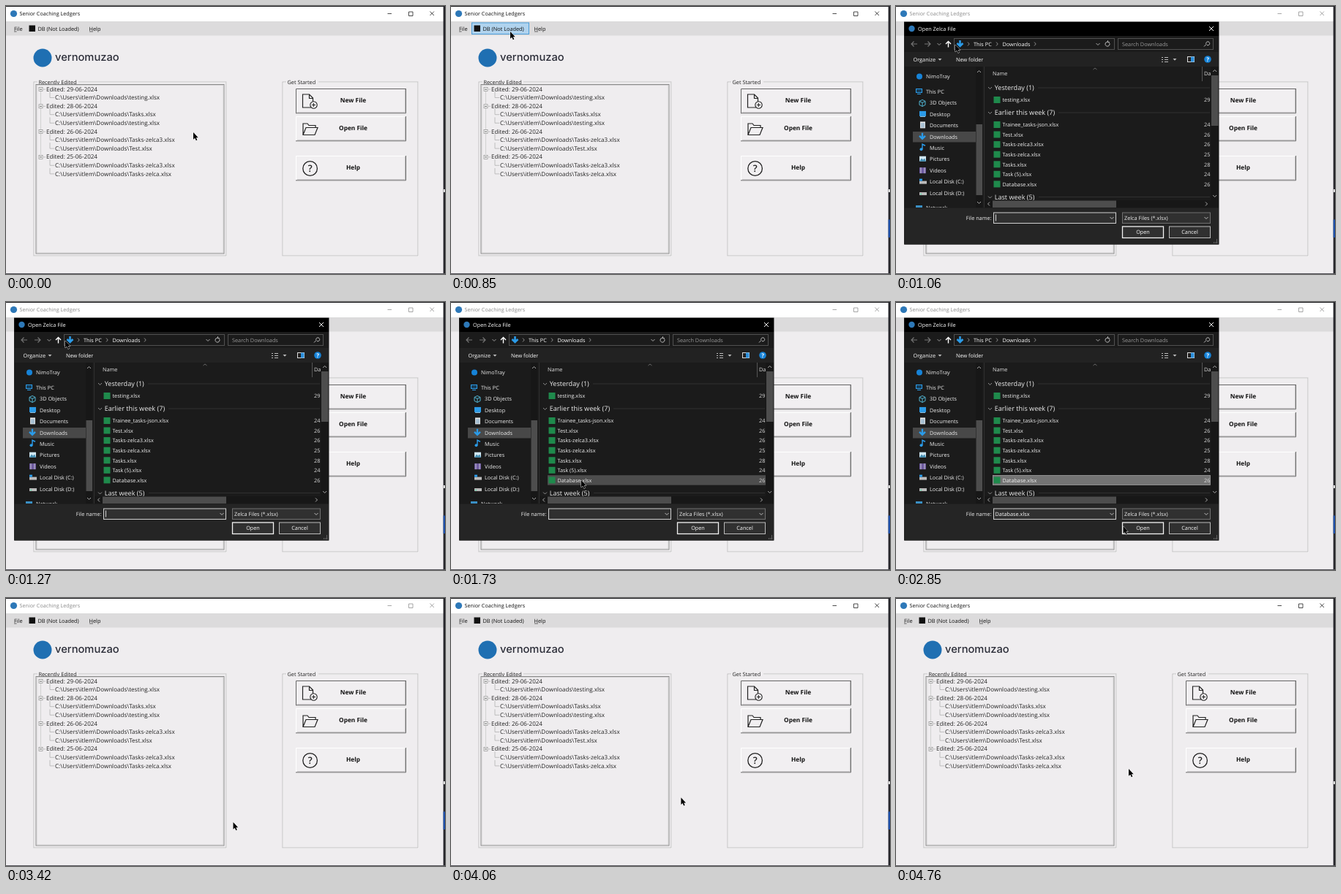
Recreate the animation shown at these times as an HTML page. Size 600 by 367 pixels, loop 4.79 s.

```html
<!DOCTYPE html>
<html lang="en">
<head>
<meta charset="utf-8">
<title>Senior Coaching Ledgers</title>
<style>
  html, body { margin: 0; width: 100%; height: 100%; overflow: hidden; background: #efedef; }
  svg { display: block; width: 100vw; height: 100vh; }
  text { font-family: "Open Sans", "Noto Sans", sans-serif; text-rendering: geometricPrecision; white-space: pre; }
</style>
</head>
<body>
<svg id="stage" viewBox="0 0 600 367"></svg>
<script>
const LOOP = 4790;
const stage = document.getElementById('stage');

// Drawing helpers, all returning SVG markup
const rect = (x, y, w, h, fill, extra = '') =>
  `<rect x="${x}" y="${y}" width="${w}" height="${h}" fill="${fill}" ${extra}/>`;
const frame = (x, y, w, h, color, fill = 'none', sw = 1) =>
  rect(x + .5, y + .5, w - 1, h - 1, fill, `stroke="${color}" stroke-width="${sw}"`);
const path = (d, color, sw = 1, fill = 'none', extra = '') =>
  `<path d="${d}" fill="${fill}" stroke="${color}" stroke-width="${sw}" ${extra}/>`;
const dot = (x, y, r, fill) => `<circle cx="${x}" cy="${y}" r="${r}" fill="${fill}"/>`;
const text = (x, y, s, size, fill, extra = '') =>
  `<text x="${x}" y="${y}" font-size="${size}" fill="${fill}" ${extra}>${s}</text>`;
const group = (id, body) => `<g id="${id}">${body}</g>`;
const chevron = (x, y, dx, dy, color, sw = 1) =>
  path(dx ? `M${x} ${y - 2.5}l${dx} 2.5l${-dx} 2.5` : `M${x - 2.5} ${y}l2.5 ${dy}l2.5 ${-dy}`, color, sw);

function titleBar(color) {
  return text(18.5, 13.4, 'Senior Coaching Ledgers', 7.2, color) +
    path('M521.500 10.500h5.500M550.500 8h5.500v5.500h-5.500zM579.500 7.500l5.500 5.500m0-5.500l-5.500 5.500', color, .75);
}

function groupBox(x, w, label, labelW) {
  return frame(x, 104, w, 239, '#fff') + frame(x - .5, 103.5, w, 239, '#b4b3b4', 'none', .8) +
    rect(x + 5, 101, labelW, 6, '#efedef') + text(x + 6.5, 106.7, label, 7.3, '#222');
}

function tree() {
  const days = [
    ['29-06-2024', 'testing'],
    ['28-06-2024', 'Tasks', 'testing'],
    ['26-06-2024', 'Tasks-zelca3', 'Test'],
    ['25-06-2024', 'Tasks-zelca3', 'Tasks-zelca'],
  ];
  let y = 113.6, out = '';
  for (const [day, ...files] of days) {
    out += frame(44.5, y - 2.5, 6, 6, '#888', '#fff', .7) + path(`M46 ${y + .5}h3`, '#333', .8) +
      path(`M51 ${y + .5}h3`, '#aaa', .7) + text(55, y + 3, 'Edited: ' + day, 8.05, '#222');
    files.forEach(f => {
      const top = y + 4;
      y += 11.6;
      out += path(`M60 ${top}V${y + .3}h6`, '#aaa', .7) +
        text(67, y + 3, `C:\\Users\\itlem\\Downloads\\${f}.xlsx`, 8.05, '#222');
    });
    y += 11.6;
  }
  return path('M47.5 117V203', '#c4c4c4', .7) + out;
}

function button(y, label, isDefault) {
  return rect(396, y, 151, 34, '#f1eff1') +
    path(`M396.5 ${y + 34}V${y + .5}H547`, isDefault ? '#666' : '#fff') +
    path(`M396 ${y + 33.8}H546.5V${y}`, '#6a6a6a') +
    path(`M398 ${y + 32.7}H545.4V${y + 1}`, '#b4b3b4', .8) +
    text(474.5, y + 18.6, label, 8.3, '#111', 'font-weight="700" text-anchor="middle"');
}

function mainWindow() {
  return rect(0, 0, 600, 367, '#efedef') + rect(0, 1, 598, 20, '#fff') + rect(0, 21, 598, 19.5, '#dcdbdc') +
    dot(10.5, 10.5, 4.6, '#2d78b8') +
    group('titleOn', titleBar('#111')) + group('titleOff', titleBar('#8a8a8a')) +
    group('menuHover', frame(28, 22.5, 79, 16.5, '#4a9cd8', '#b0d3ee')) +
    text(11, 33.6, 'File', 7.35, '#111') + path('M11 35h3.5M114 35h5', '#111', .6) +
    rect(31.5, 26.5, 8.5, 8.5, '#111') + text(43.5, 33.6, 'DB (Not Loaded)', 7.35, '#111') +
    text(113.5, 33.6, 'Help', 7.35, '#111') +
    dot(50, 71, 12.5, '#1f6fb2') +
    text(67, 75.2, 'vernomuzao', 14.7, '#2b2d38', 'style="font-family:Inter,sans-serif" font-weight="500"') +
    groupBox(38, 264, 'Recently Edited', 56) +
    frame(40.5, 107, 258, 232.5, '#808080', '#efedef', .9) + frame(41.5, 108, 256, 230.5, '#c4c3c4', 'none', .6) + tree() +
    groupBox(378, 186, 'Get Started', 44) +
    button(113, 'New File', true) + button(151, 'Open File') + button(205, 'Help') +
    path('M417 139h-11.5v-18h9l5 5v5M414.500 121v5.500h5', '#222', 1.2) +
    `<circle cx="420.500" cy="135.500" r="4.700" fill="#f1eff1" stroke="#222" stroke-width="1.100"/>` +
    path('M418 135.5h5M420.500 133v5', '#222', 1) +
    path('M406 176.500v-15.500h6l2 2.500h9v3M406 176.500l4-10h16l-4 10z', '#222', 1.2) +
    `<circle cx="415.600" cy="222.500" r="9.800" fill="none" stroke="#222" stroke-width="1.300"/>` +
    text(415.6, 227, '?', 13, '#222', 'font-weight="600" text-anchor="middle"') +
    rect(0, 0, 600, 1, '#17171b') + rect(597.7, 0, 2.3, 367, '#26262b') + rect(0, 366, 600, 1, '#55555a') +
    rect(598, 251, 2, 4, '#ddd') + group('edgeBlue', rect(597.7, 292.5, 2.3, 24.5, '#1d4fa8'));
}

const fileRows = [
  [128.5, 'testing', 29], [162.5, 'Trainee_tasks-json', 24], [176, 'Test', 26], [189.6, 'Tasks-zelca3', 26],
  [203.2, 'Tasks-zelca', 25], [216.8, 'Tasks', 28], [230.3, 'Task (5)', 24], [243.9, 'Database', 26],
];

function sidebar() {
  const items = ['This PC', '3D Objects', 'Desktop', 'Documents', 'Downloads', 'Music', 'Pictures', 'Videos',
    'Local Disk (C:)', 'Local Disk (D:)'];
  const blue = '#2b9be8';
  const icons = [
    y => frame(27, y - 4, 9, 6, blue, '#173b55') + rect(29, y + 3, 5, 1, blue),
    y => path(`M36 ${y - 4}l4 2v5l-4 2l-4-2v-5zM32 ${y - 2}l4 2l4-2M36 ${y}v5`, '#58c7e8', .9),
    y => rect(32, y - 4, 9, 7, blue) + rect(33, y + 3, 7, 1, '#9bd2f5'),
    y => rect(33, y - 5, 7, 9, '#d9dde0') + path(`M34 ${y - 2}h5m-5 2h5m-5 2h5`, '#4b89b8', .7),
    y => path(`M36 ${y - 5}v8m-4-4l4 4l4-4`, blue, 2.4),
    y => path(`M36 ${y + 2}v-7l4 2`, blue, 1.4) + dot(34.5, y + 2, 2, blue),
    y => rect(32, y - 4, 9, 7, '#cfe6f2') + path(`M32 ${y + 3}l3-4l2 2l2-2l2 4z`, 'none', 0, '#3e8bb0'),
    y => rect(32, y - 4, 9, 8, '#6d5aa0') + path(`M34 ${y - 4}v8m5-8v8`, '#ddd', .8),
    y => rect(32, y - 1, 10, 4, '#bbb') + rect(32, y - 4, 4, 3, blue),
    y => rect(32, y - 1, 10, 4, '#bbb') + rect(33, y + 1, 2, 1, '#3d9'),
  ];
  return rect(23, 172, 86, 14.5, '#484848') + dot(32, 96.5, 4, '#1683d8') + text(41, 99.4, 'NimoTray', 7.3, '#eee') +
    items.map((s, i) => {
      const y = 117 + i * 15.45;
      return icons[i](y) + text(i ? 46 : 41, y + 2.7, s, 7.3, '#eee');
    }).join('') +
    `<svg x="12" y="83" width="96" height="193" viewBox="12 83 96 193" style="width:96px;height:193px">${
      rect(27, 273, 9, 5, '#3a8fc4') + text(41, 279.2, 'Network', 7.3, '#eee')}</svg>` +
    rect(109, 83, 9, 193, '#171717') + rect(109.5, 162, 8.5, 97, '#4d4d4d') +
    chevron(113.5, 91, 0, -2.5, '#aaa') + chevron(113.5, 268, 0, 2.5, '#aaa');
}

function fileList() {
  const heading = (y, s, w) => chevron(128.5, y - 1, 0, 2.5, '#aaa', .8) +
    text(134.7, y + 3.3, s, 9.1, '#eee') + path(`M${135 + w} ${y}H429`, '#3a3a3a', .7);
  return text(132, 95, 'Name', 7.3, '#ddd') + path('M418.500 83V103', '#555') + text(421, 95, 'Da', 7.3, '#ddd') +
    chevron(272, 87, 0, -2, '#888', .7) +
    heading(112, 'Yesterday (1)', 59) + heading(146, 'Earlier this week (7)', 87) + heading(261.5, 'Last week (5)', 60) +
    `<rect id="rowHover" x="132" width="298" height="13.500" fill="#4d4d4d"/>` +
    group('rowPicked', frame(132, 237, 298, 14, '#a0a0a0', '#747474', .8)) +
    fileRows.map(([y, s, day]) => rect(133.5, y - 4.5, 9, 9, '#1f8a4c') +
      text(145.5, y + 2.7, s + '.xlsx', 7.25, '#f2f2f2') + text(421, y + 2.7, day, 7.3, '#ddd')).join('') +
    rect(430.5, 83, 10.5, 183, '#171717') + rect(431, 95, 9.5, 69, '#4d4d4d') +
    chevron(435.7, 90, 0, -2.5, '#aaa') + chevron(435.7, 259, 0, 2.5, '#aaa') +
    rect(121, 266, 320, 10.5, '#171717') + rect(132, 266.500, 169, 9.5, '#4d4d4d') +
    chevron(128, 271, -2.5, 0, '#aaa') + chevron(423, 271, 2.5, 0, '#aaa');
}

function dialog() {
  return rect(11, 21.5, 430.5, 305, '#1b1b1b') + rect(11.5, 22, 429.5, 19, '#000') +
    dot(21.5, 31, 4.2, '#2d78b8') + text(30, 33.7, 'Open Zelca File', 7.3, '#fff') +
    path('M428 28l6 6m0-6l-6 6', '#fff', 1) +
    // navigation row
    path('M29 52h-8m3.500-3.500l-3.500 3.500l3.500 3.500', '#777', 1.1) +
    path('M39 52h8m-3.500-3.500l3.500 3.500l-3.500 3.500', '#777', 1.1) + chevron(59, 51, 0, 2.5, '#999') +
    path('M71.500 56.500v-8m-3.500 3.500l3.500-3.500l3.500 3.500', '#fff', 1.4) +
    frame(79, 44, 220, 16, '#505050') + path('M87.500 47v8m-4-4l4 4l4-4', '#2b9be8', 2.6) +
    chevron(98, 52, 2.2, 0, '#aaa', .8) + text(106, 54.7, 'This PC', 7.3, '#fff') +
    chevron(137, 52, 2.2, 0, '#aaa', .8) + text(145.5, 54.7, 'Downloads', 7.3, '#fff') +
    chevron(189, 52, 2.2, 0, '#aaa', .8) + chevron(276, 51, 0, 2.5, '#aaa') +
    path('M291.500 50.500a3 3 0 1 1-2-1.300m0-2v2.500h2.500', '#bbb', 1) +
    frame(303, 44, 131, 16, '#505050') + text(309, 54.7, 'Search Downloads', 7.3, '#9a9a9a') +
    path('M421 55.500l3-3a2.500 2.500 0 1 1 1 1', '#bbb', 1) +
    // toolbar
    rect(11.5, 63, 429.5, 20, '#222') + text(23.5, 75.8, 'Organize', 7.3, '#fff') +
    path('M57.500 72h5l-2.500 2.800z', 'none', 0, '#bbb') + text(82, 75.8, 'New folder', 7.3, '#fff') +
    path('M363 70.500h2m2 0h5m-9 3h2m2 0h5m-9 3h2m2 0h5', '#bbb', 1.1) +
    path('M378.500 72h5l-2.500 2.800z', 'none', 0, '#bbb') +
    frame(398, 69, 10, 8, '#ddd', '#222') + rect(403, 69.500, 4.5, 7, '#2b8fdc') +
    dot(426, 73, 4.8, '#1683d8') + text(426, 75.9, '?', 7.8, '#fff', 'font-weight="700" text-anchor="middle"') +
    path('M120.500 83V276', '#303030') + sidebar() + fileList() +
    // footer
    rect(11.5, 276.500, 429.500, 50, '#252525') + text(130.5, 293, 'File name:', 7.3, '#eee', 'text-anchor="end"') +
    frame(133, 282.5, 168, 15.5, '#d0d0d0', '#303030') + chevron(295, 289, 0, 2.5, '#bbb') +
    group('caret', path('M136.500 285.500v9', '#fff', .8)) + group('fileName', text(135.5, 293, 'Database.xlsx', 7.3, '#fff')) +
    frame(309, 282.5, 121, 15.5, '#707070', '#303030') + text(312, 293, 'Zelca Files (*.xlsx)', 7.3, '#eee') +
    chevron(424, 289, 0, 2.5, '#bbb') +
    frame(309, 301.5, 57, 16.5, '#f2f2f2', '#303030', 1.3) + frame(373, 301.5, 57, 16.5, '#bbb', '#303030') +
    text(337.5, 312.4, 'Open', 7.3, '#fff', 'text-anchor="middle"') +
    text(401.5, 312.4, 'Cancel', 7.3, '#fff', 'text-anchor="middle"') +
    [0, 1, 2].map(i => path(`M${438 - 2 * i} ${324}h1M438 ${324 - 2 * i}h1`, '#999')).join('');
}

stage.innerHTML = mainWindow() + group('dialog', dialog()) +
  group('cursor', path('M0 0V9.800l2.200-2l1.600 3.500l1.500-.7l-1.500-3.300h2.900z', '#fff', .8, '#000', 'paint-order="stroke"'));

const el = id => document.getElementById(id);
const show = (id, on) => el(id).setAttribute('visibility', on ? 'inherit' : 'hidden');

// Pointer stops: time, x, y
const stops = [
  [0, 256, 173], [40, 256, 173], [530, 81, 35], [880, 81, 35], [1030, 81, 53], [1290, 81, 53],
  [1650, 178, 244], [2210, 178, 244], [2730, 310.5, 307], [3600, 310.5, 307],
  [3850, 312, 299], [4340, 318, 234], [LOOP, 318, 234],
];

function pointerAt(t) {
  const i = Math.max(1, stops.findIndex(s => s[0] > t));
  const [t0, x0, y0] = stops[i - 1], [t1, x1, y1] = stops[i];
  const k = (t - t0) / (t1 - t0), e = k * k * (3 - 2 * k);
  return [x0 + (x1 - x0) * e, y0 + (y1 - y0) * e];
}

function draw(t) {
  const within = (a, b) => t >= a && t < b;
  const [x, y] = pointerAt(t);
  const open = within(1040, 3300), picked = within(1950, 3300), inactive = within(1040, 3480);
  const row = fileRows.find(r => Math.abs(r[0] - y) < 6.8);
  el('cursor').setAttribute('transform', `translate(${x} ${y})`);
  show('dialog', open);
  show('titleOn', !inactive);
  show('titleOff', inactive);
  show('menuHover', !open && x > 28 && x < 107 && y > 23 && y < 40);
  show('edgeBlue', within(300, 4400));
  show('rowPicked', picked);
  show('fileName', picked);
  show('caret', within(1040, 1600));
  show('rowHover', row && x > 132);
  if (row) el('rowHover').setAttribute('y', row[0] - 6.7);
}

const start = performance.now();
function tick() {
  draw((performance.now() - start) % LOOP);
  requestAnimationFrame(tick);
}
draw(0);
tick();
</script>
</body>
</html>
```
